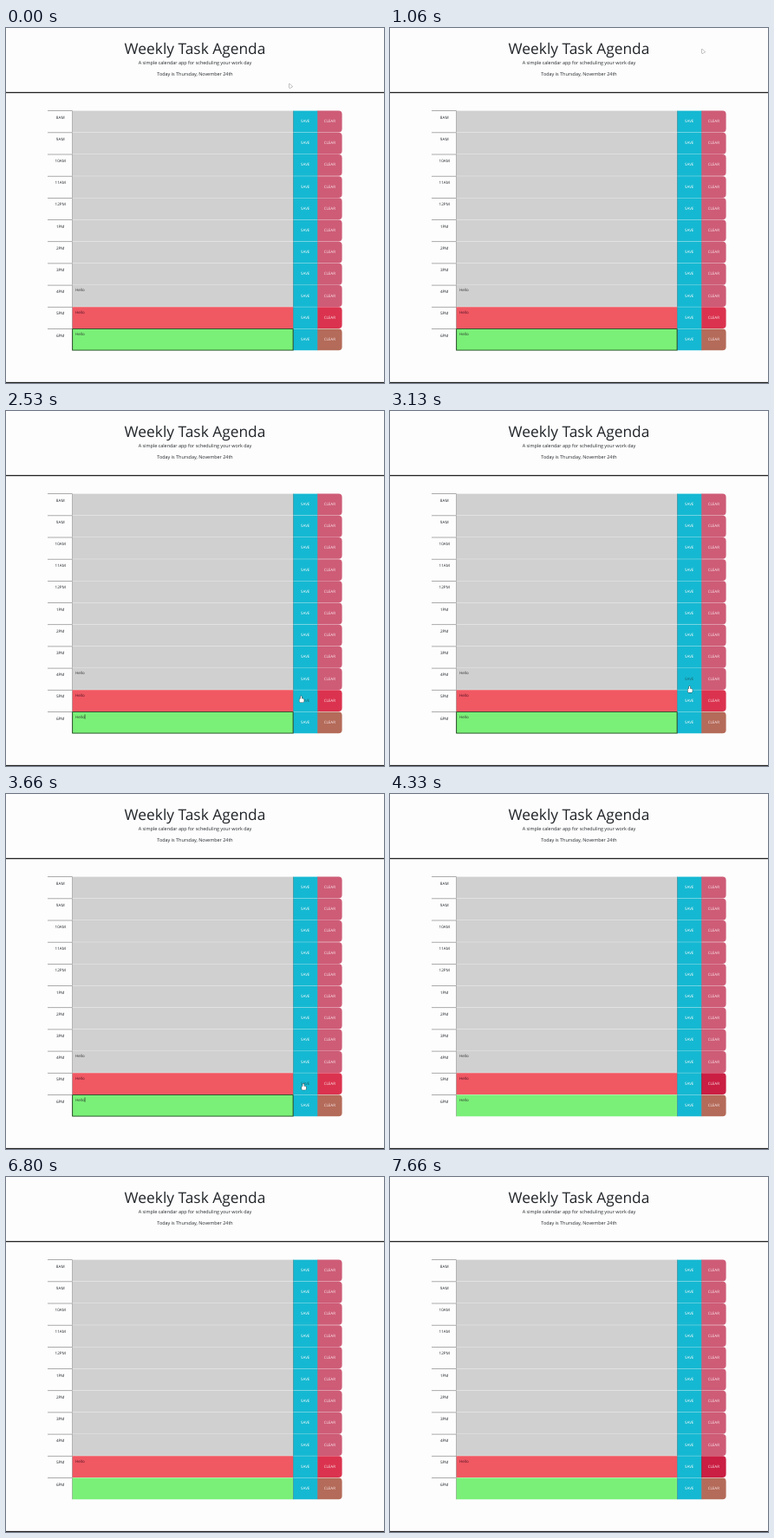
Write an HTML page with a canvas that moves like this. It is 436 by 410 pixels and loops after 8000 ms.

```html
<!DOCTYPE html>
<html lang="en">
<head>
<meta charset="utf-8">
<title>Day planner</title>
<style>
  html, body { margin: 0; width: 100%; height: 100%; overflow: hidden; background: #fdfdfd; }
  canvas { display: block; width: 436px; height: 410px; }
</style>
</head>
<body>
<canvas></canvas>
<script>
const W = 436, H = 410, LOOP = 8000;
const canvas = document.querySelector('canvas');
const ctx = canvas.getContext('2d');
const dpr = window.devicePixelRatio || 1;
canvas.width = W * dpr;
canvas.height = H * dpr;

const INK = '#212529';
const grid = { top: 95.3, pitch: 25.18, rows: 11, hour: 48, area: 76.5, save: 331.3, clear: 359.2, right: 387.6 };
const PRESENT = 9, FUTURE = 10;
const BLUR = 3730, HIDE = 4330, RELOAD = 6660, LOADED = 6730, RETURN = 7130, DONE = 7660;

const spot = {
  start: { x: 327, y: 64.5 },
  top: { x: 360, y: 24.5 },
  save: { x: 343, y: 334.5 },
  clear: { x: 371, y: 331 },
  entry: { x: 33, y: 4 },
  away: { x: -20, y: -20 }
};

function glide(from, to, t, begin, end) {
  const u = Math.min(1, Math.max(0, (t - begin) / (end - begin)));
  const e = u * u * (3 - 2 * u);
  return { x: from.x + (to.x - from.x) * e, y: from.y + (to.y - from.y) * e };
}

// Small loop over the neighbouring save buttons
function wander(t) {
  const u = (t - 2000) / 1660;
  return {
    x: spot.save.x - 2.8 * Math.sin(2 * Math.PI * u),
    y: spot.save.y - 16.8 * Math.sin(Math.PI * u * u)
  };
}

function pointerAt(t) {
  if (t < 1200) return glide(spot.start, spot.top, t, 60, 930);
  if (t < 2000) return glide(spot.top, spot.save, t, 1200, 1730);
  if (t < 3660) return wander(t);
  if (t < RELOAD) return glide(spot.save, spot.clear, t, BLUR, 4260);
  if (t < RETURN) return spot.away;
  return glide(spot.entry, spot.clear, t, RETURN, 7600);
}

function rect(x, y, w, h, color) {
  ctx.fillStyle = color;
  ctx.fillRect(x, y, w, h);
}

function text(str, x, y, size, color, align = 'center', weight = 400) {
  ctx.font = `${weight} ${size}px "Open Sans", sans-serif`;
  ctx.textAlign = align;
  ctx.fillStyle = color;
  ctx.fillText(str, x, y);
}

function hourLabel(i) {
  const hour = 8 + i;
  return `${(hour + 11) % 12 + 1}${hour < 12 ? 'AM' : 'PM'}`;
}

function drawHeader(loaded) {
  const weight = loaded ? 400 : 300;
  text('Weekly Task Agenda', 218, 30, 17.35, loaded ? INK : '#333', 'center', weight);
  text('A simple calendar app for scheduling your work day', 218, 42.1, 5.43,
    loaded ? INK : '#444', 'center', weight);
  if (loaded) text('Today is Thursday, November 24th', 218, 54.7, 5.43, INK);
  rect(0, loaded ? 73.9 : 61.6, W, 1.3, '#222');
}

function drawRow(i, t, pointer) {
  const y = grid.top + i * grid.pitch, h = grid.pitch, gap = 0.3;
  const { hour, area, save, clear, right } = grid;
  const inRow = pointer.y >= y && pointer.y < y + h;
  const overSave = inRow && pointer.x >= save && pointer.x < clear;
  const overClear = inRow && pointer.x >= clear && pointer.x < right;
  const areaColor = i === FUTURE ? '#7af078' : i === PRESENT ? '#f05862' : '#d0d0d0';
  const clearColor = i === FUTURE ? '#b46b59' : i < PRESENT ? '#ce5c77'
    : overClear ? '#ca1e43' : '#db334f';

  rect(hour, y, area - hour, 0.7, '#888');
  text(hourLabel(i), 62.7, y + 9.4, 4.6, INK);

  rect(area, y + gap, save - area, h - gap, areaColor);
  rect(area, y + gap, 0.4, h - gap, '#666');

  rect(save, y + gap, clear - save, h - gap, '#15b8d2');
  rect(save, y + gap, 0.4, h - gap, '#345d66');
  text('SAVE', 345.2, y + 13.8, 4.5, overSave ? '#18616f' : '#fff');

  ctx.fillStyle = clearColor;
  ctx.beginPath();
  ctx.roundRect(clear, y + gap, right - clear, h - gap, [0, 4, 4, 0]);
  ctx.fill();
  rect(clear, y + gap, 0.4, h - gap, overClear ? '#26323a' : '#54778a');
  text('CLEAR', 373.3, y + 13.8, 4.5, '#fbe8ec');

  const filled = i === PRESENT || (i >= 8 && t < RELOAD);
  if (filled) text('Hello', 80, y + 7.6, 4.45, i === PRESENT ? '#4f1428' : '#303530', 'left');

  if (i === FUTURE && t < BLUR) {
    ctx.strokeStyle = '#173517';
    ctx.lineWidth = 0.8;
    ctx.strokeRect(area + 0.2, y + 0.5, save - area - 0.4, h - 0.7);
    if ((t + 920) % 1060 < 530) rect(90.7, y + 3.4, 0.6, 5.2, '#111');
  }
}

function drawPointer({ x, y }) {
  const overButton = x >= grid.save && x < grid.right
    && y >= grid.top && y < grid.top + grid.rows * grid.pitch;
  const shape = new Path2D();
  if (overButton) {
    shape.roundRect(x - 2, y + 3, 5.2, 4.2, 1.2);
    shape.roundRect(x - 0.7, y, 1.4, 5, 0.6);
  } else {
    shape.moveTo(x, y);
    shape.lineTo(x, y + 4.8);
    shape.lineTo(x + 3.3, y + 3.4);
    shape.closePath();
  }
  ctx.strokeStyle = overButton ? '#333' : '#777';
  ctx.lineWidth = 0.9;
  ctx.stroke(shape);
  ctx.fillStyle = '#fff';
  ctx.fill(shape);
}

function draw(t) {
  ctx.setTransform(dpr, 0, 0, dpr, 0, 0);
  ctx.textRendering = 'geometricPrecision';
  const loaded = t < RELOAD || t >= LOADED;
  const pointer = pointerAt(t);
  rect(0, 0, W, H, '#fdfdfd');
  drawHeader(loaded);
  rect(0, 408.9, W, 1.1, '#222');
  if (!loaded) return;
  for (let i = 0; i < grid.rows; i++) drawRow(i, t, pointer);
  if (t < HIDE || (t >= RETURN && t < DONE)) drawPointer(pointer);
}

const start = performance.now();
function tick() {
  draw((performance.now() - start) % LOOP);
  requestAnimationFrame(tick);
}
tick();
</script>
</body>
</html>
```
